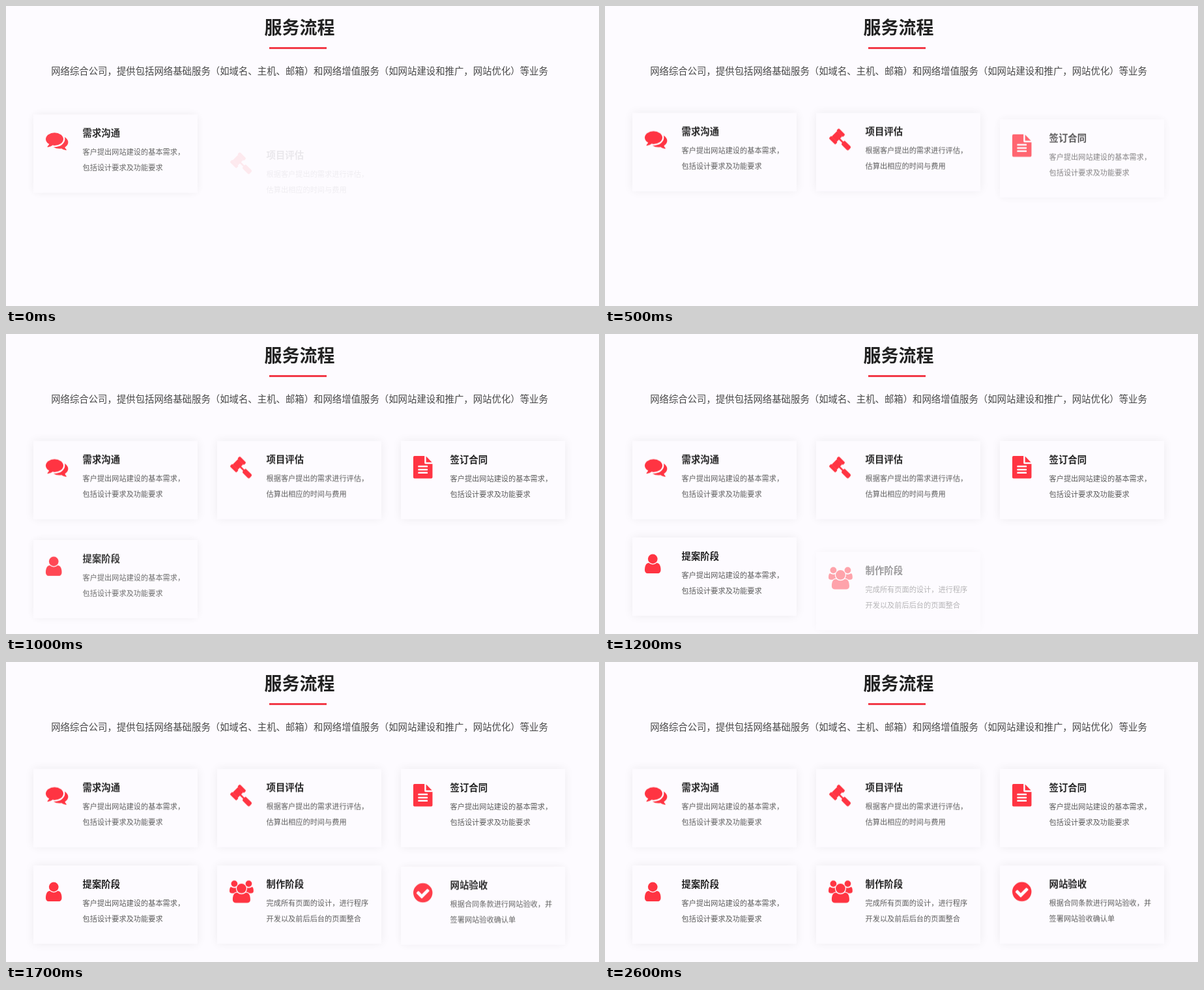
Write an HTML page that moves like this. It is 910 by 460 pixels and loops after 2.7 s.

```html
<!DOCTYPE html>
<html lang="zh-CN">
<head>
<meta charset="utf-8">
<title>服务流程</title>
<style>
  html, body { margin: 0; width: 100%; height: 100%; overflow: hidden; }
  body {
    position: relative;
    background: #fdfbff;
    font-family: "Noto Sans CJK SC", "Noto Sans CJK", sans-serif;
    white-space: nowrap;
  }
  h1, h2, p { position: absolute; margin: 0; }
  h1, .lead { left: 0; width: 901px; text-align: center; }
  h1 { top: 12px; font-size: 27px; line-height: 40px; color: #222; }
  .bar { position: absolute; left: 404px; top: 63px; width: 88px; height: 3px; background: #f23a48; }
  .lead { top: 83.5px; font-size: 14.4px; line-height: 30px; color: #484848; }
  .card {
    position: absolute;
    width: 251.7px;
    height: 120.3px;
    background: #fdfbff;
    box-shadow: 0 0 14px rgba(0, 0, 0, .065);
    will-change: transform, opacity;
  }
  .card svg { position: absolute; left: 19.2px; top: 23px; width: 34.4px; height: 34.4px; overflow: visible; fill: #ff3442; }
  .card h2 { left: 75.5px; top: 18.4px; font-size: 14.4px; line-height: 20px; color: #222; }
  .card p { left: 75.5px; top: 44.8px; font-size: 11.2px; line-height: 24px; color: #5c5c5c; }
</style>
</head>
<body>
<h1>服务流程</h1>
<div class="bar"></div>
<p class="lead">网络综合公司，提供包括网络基础服务（如域名、主机、邮箱）和网络增值服务（如网站建设和推广，网站优化）等业务</p>
<script>
const LOOP = 2700, STEP = 100, DURATION = 480, RISE = 40;

const circle = (x, y, r) => `<circle cx="${x}" cy="${y}" r="${r}"/>`;
const rect = (x, y, w, h, r) => `<rect x="${x}" y="${y}" width="${w}" height="${h}" rx="${r}"/>`;
const path = d => `<path fill-rule="evenodd" d="${d}"/>`;
const group = (transform, body) => `<g transform="${transform}">${body}</g>`;
const textLine = y => `M544 ${y}h704q32 0 32 32v64q0 32-32 32h-704q-32 0-32-32v-64q0-32 32-32z`;

const side = circle(448, 256, 256) +
  path('M657 896q-162 5-265 128h-134q-82 0-138-40.5t-56-118.5q0-353 124-353 6 0 43.5 21t97.5 42.5 119 21.5q67 0 133-23-5 37-5 66 0 139 81 256z');

// Icons on a 1792-unit grid; x is the empty margin at the left.
const icons = {
  chat: { x: 0, body:
    '<ellipse cx="704" cy="768" rx="704" ry="512"/>' +
    path('M528 1264q-124 88-278 128-36 9-86 16-26 2-35-29 0-16 14-32 90-92 128-178L500 1000z') +
    path('M1792 1024q0 120-71 224.5t-195 176.5q30 74 119 166 18 20 14 36-9 30-35 29-50-7-86-16-154-40-278-128-90 16-176 16-271 0-472-132 58 4 88 4 161 0 309-45t264-129q125-92 192-212t67-254q0-77-23-152 129 71 204 178t75 230z') },
  gavel: { x: 0, body: group('rotate(45)',
    rect(658, -300, 587, 600, 34) + rect(594, 292, 728, 275, 90) + rect(594, -567, 728, 275, 90) +
    rect(1200, -68, 450, 136, 0) + rect(1607, -204, 772, 408, 120)) },
  file: { x: 128, body: path(
    'M1596 476q14 14 28 36h-472v-472q22 14 36 28zM1120 640h544v1056q0 96-96 96h-1344q-96 0-96-96v-1600q0-96 96-96h800v544q0 96 96 96z' +
    [768, 1024, 1280].map(textLine).join('')) },
  user: { x: 256, body: circle(896, 512, 384) +
    path('M1536 1399q0 109-62.5 187t-150.5 78h-854q-88 0-150.5-78t-62.5-187q0-85 8.5-160.5t31.5-152 58.5-131 94-89 134.5-34.5q131 128 313 128t313-128q76 0 134.5 34.5t94 89 58.5 131 31.5 152 8.5 160.5z') },
  team: { x: 64, body: side + group('translate(2048) scale(-1 1)', side) + circle(1024, 640, 384) +
    path('M1728 1533q0 120-73 189.5t-194 69.5h-874q-121 0-194-69.5t-73-189.5C320 1180 420 960 666 960 740 980 830 1099 1024 1099S1308 980 1382 960C1628 960 1728 1180 1728 1533z') },
  check: { x: 128, body: path(
    'M128 896a768 768 0 1 1 1536 0a768 768 0 1 1-1536 0z' +
    'M1412 734q0-28-18-46l-91-90q-19-19-45-19t-45 19l-408 407-226-226q-19-19-45-19t-45 19l-91 90q-18 18-18 46 0 27 18 45l362 362q19 19 45 19 27 0 46-19l543-543q18-18 18-45z') }
};

const brief = ['客户提出网站建设的基本需求，', '包括设计要求及功能要求'];
const steps = [
  { icon: 'chat', title: '需求沟通', lines: brief, start: -336 },
  { icon: 'gavel', title: '项目评估', lines: ['根据客户提出的需求进行评估，', '估算出相应的时间与费用'], start: -46 },
  { icon: 'file', title: '签订合同', lines: brief, start: 281 },
  { icon: 'user', title: '提案阶段', lines: brief, start: 698 },
  { icon: 'team', title: '制作阶段', lines: ['完成所有页面的设计，进行程序', '开发以及前后后台的页面整合'], start: 1072 },
  { icon: 'check', title: '网站验收', lines: ['根据合同条款进行网站验收，并', '签署网站验收确认单'], start: 1346 }
];

const cards = steps.map(({ icon, title, lines }, i) => {
  const el = document.createElement('div');
  const { x, body } = icons[icon];
  el.className = 'card';
  el.style.left = 42 + 282.1 * (i % 3) + 'px';
  el.style.top = 163.7 + 147.8 * Math.floor(i / 3) + 'px';
  el.innerHTML = `<svg viewBox="${x} 0 1792 1792">${body}</svg><h2>${title}</h2><p>${lines.join('<br>')}</p>`;
  document.body.append(el);
  return el;
});

// The CSS "ease" curve, cubic-bezier(.25, .1, .25, 1).
function ease(x) {
  if (x <= 0) return 0;
  if (x >= 1) return 1;
  const bezier = (a, b, u) => 3 * a * u * (1 - u) ** 2 + 3 * b * u * u * (1 - u) + u ** 3;
  let lo = 0, hi = 1;
  for (let i = 0; i < 24; i++) {
    const mid = (lo + hi) / 2;
    if (bezier(.25, .25, mid) < x) lo = mid; else hi = mid;
  }
  return bezier(.1, 1, lo);
}

// The picture advances in steps of 100 ms.
function draw(now) {
  const t = Math.floor((now % LOOP) / STEP) * STEP;
  cards.forEach((el, i) => {
    const p = ease((t - steps[i].start) / DURATION);
    el.style.opacity = p;
    el.style.transform = `translateY(${RISE * (1 - p)}px)`;
  });
}

const begin = performance.now();
function tick() {
  draw(performance.now() - begin);
  requestAnimationFrame(tick);
}
tick();
</script>
</body>
</html>
```
